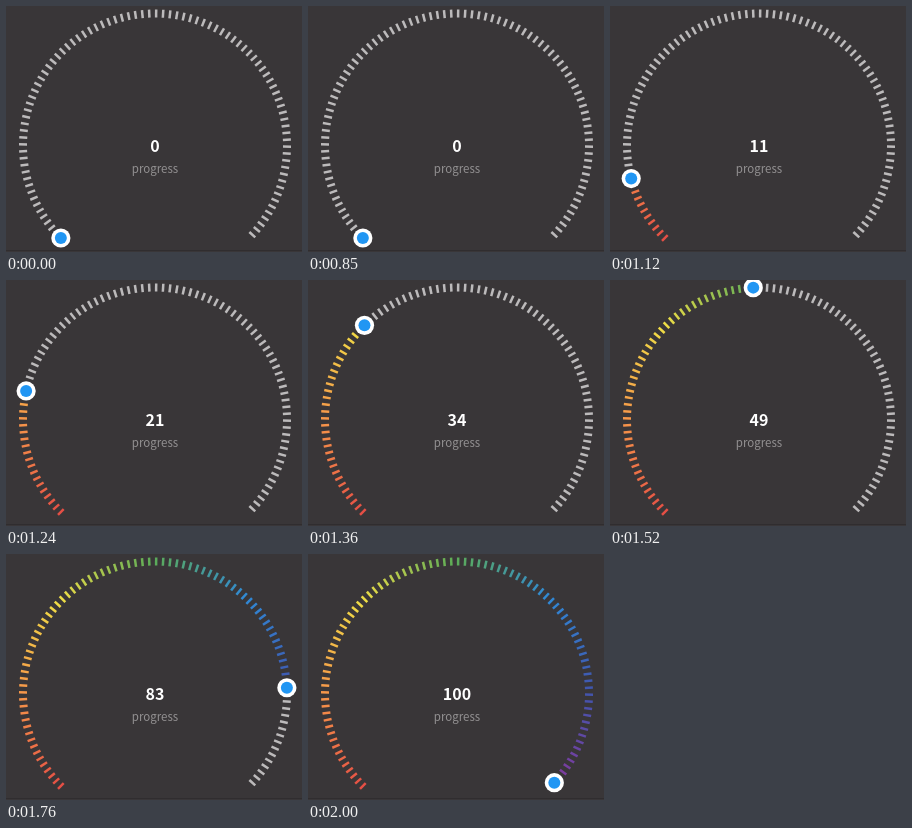
An HTML page for the animation above (2.51 s loop, 296x246 px).

```html
<!DOCTYPE html>
<html lang="en">
<head>
<meta charset="utf-8">
<title>Progress dial</title>
<style>
  html, body { margin: 0; width: 100%; height: 100%; overflow: hidden; background: #393638; }
  svg { display: block; width: 296px; height: 246px; }
  text { text-anchor: middle; font-family: "Noto Sans CJK SC", "Noto Sans CJK JP", "Noto Sans CJK", "Noto Sans", sans-serif; }
  #value { font-size: 16px; font-weight: 700; fill: #fff; }
  #label { font-size: 11.5px; font-weight: 500; fill: #939192; }
</style>
</head>
<body>
<svg viewBox="0 0 296 246">
  <path d="M0 244.5H296" stroke="#302d2f"/>
  <g id="ticks" stroke-width="2.5"></g>
  <text id="value" x="149" y="146">0</text>
  <text id="label" x="149" y="166.5">progress</text>
  <g id="knob">
    <circle r="9.6" fill="#fff"/>
    <circle r="6" fill="#2196f3"/>
  </g>
</svg>
<script>
const LOOP = 2510, STEP = 40;
const CX = 149, CY = 139.5, R = 132;
const LAST = 89; // index of the final tick, 3 degrees apart
const GRAY = '#bcbabb';
const rainbow = ['#e54f45', '#f6964a', '#f0de46', '#5cac57', '#3089d6', '#4056ad', '#83399c'];
const keys = [[850, 0], [1120, 10], [1360, 30], [1520, 44], [1640, 62], [2000, LAST]]; // time, tick
const $ = id => document.getElementById(id);

function point(tick, r) {
  const a = (135.5 + tick * 3) * Math.PI / 180;
  return [CX + r * Math.cos(a), CY + r * Math.sin(a)];
}

function colorAt(tick) {
  const x = tick / LAST * (rainbow.length - 1), i = Math.floor(x);
  return `color-mix(in srgb, ${rainbow[i + 1] || rainbow[i]} ${(x - i) * 100}%, ${rainbow[i]})`;
}

// Slope through the neighbouring keys, at rest on both ends
function slope(i) {
  const a = keys[i - 1], b = keys[i + 1];
  return a && b ? (b[1] - a[1]) / (b[0] - a[0]) : 0;
}

function tickAt(time) {
  const t = Math.floor((time + 5) / STEP) * STEP;
  if (t <= keys[0][0]) return 0;
  const i = keys.findIndex(k => k[0] > t);
  if (i < 0) return LAST;
  const [t0, p0] = keys[i - 1], [t1, p1] = keys[i];
  const h = t1 - t0, u = (t - t0) / h, w = 1 - u;
  return Math.round(w * w * ((1 + 2 * u) * p0 + u * h * slope(i - 1))
                  + u * u * ((3 - 2 * u) * p1 - w * h * slope(i)));
}

const ticks = Array.from({ length: LAST + 1 }, (_, i) => {
  const tick = document.createElementNS('http://www.w3.org/2000/svg', 'path');
  tick.setAttribute('d', `M${point(i, R - 4)}L${point(i, R + 4)}`);
  return $('ticks').appendChild(tick);
});

const start = performance.now();
function draw() {
  const now = tickAt((performance.now() - start) % LOOP);
  ticks.forEach((tick, i) => tick.style.stroke = i <= now ? colorAt(i) : GRAY);
  $('knob').setAttribute('transform', `translate(${point(now, R)})`);
  $('value').textContent = Math.round(now / LAST * 100);
  requestAnimationFrame(draw);
}
draw();
</script>
</body>
</html>
```
